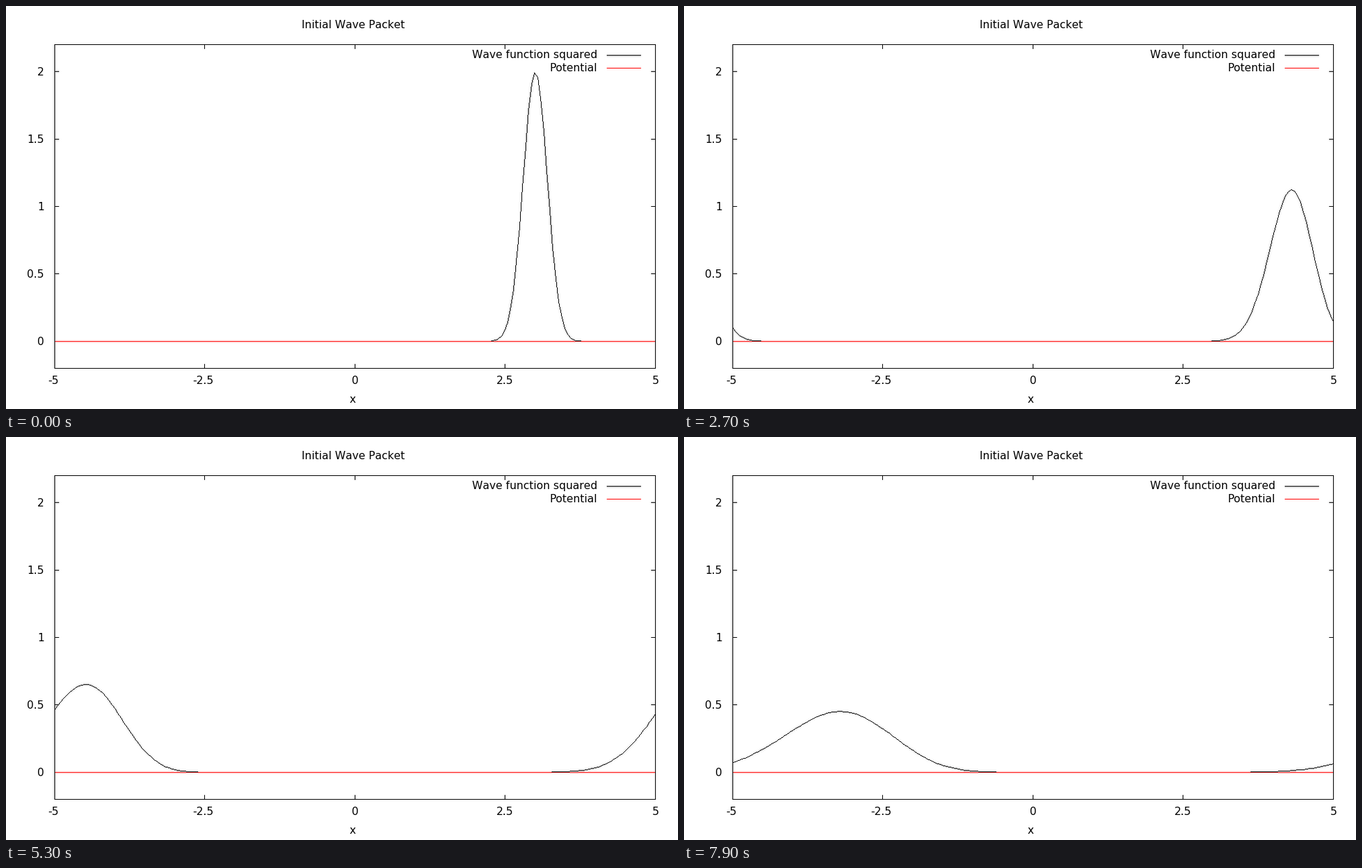
Animation, 966 px wide and 580 px high, one loop 8 s. Source, as a matplotlib script:

```python
import numpy as np
import matplotlib.pyplot as plt
from matplotlib.animation import FuncAnimation

# The chart is laid out on a 1000 x 600 canvas and shown slightly smaller.
CANVAS_W, CANVAS_H = 1000, 600
W, H, DPI = 966, 580, 100
LEFT, RIGHT, TOP, BOTTOM = 72, 966, 57, 539
X_MIN, X_MAX, Y_MIN, Y_MAX = -5, 5, -0.2, 2.2
TICK = 6
FONT_PX = 16 * W / CANVAS_W
FRAMES, INTERVAL = 80, 100
BLACK, RED = (0, 0, 0), (255, 0, 0)

# Gaussian packet on a periodic lattice
N, DT = 200, 0.005
X0, SIGMA, K0 = 3.0, 0.2, 10.0
x = np.linspace(X_MIN, X_MAX, N)
dx = x[1] - x[0]
psi0 = np.exp(-((x - X0) / (2 * SIGMA)) ** 2 + 1j * K0 * x)
psi0 /= np.sqrt(SIGMA * np.sqrt(2 * np.pi))
psi0_k = np.fft.fft(psi0)
# Energies of the three-point Laplacian
omega = (1 - np.cos(2 * np.pi * np.fft.fftfreq(N))) / dx**2


def density(t):
    return np.abs(np.fft.ifft(psi0_k * np.exp(-1j * omega * t))) ** 2


def nearest(v):
    """Nearest integer, halves going down."""
    return np.ceil(np.asarray(v) - 0.5 - 1e-6).astype(int)


def px(v):
    scale = (RIGHT - LEFT) / (X_MAX - X_MIN)
    return nearest(LEFT + (np.asarray(v) - X_MIN) * scale)


def py(v):
    scale = (BOTTOM - TOP) / (Y_MAX - Y_MIN)
    return BOTTOM - nearest((np.asarray(v) - Y_MIN) * scale)


def stroke(img, xs, ys, color):
    """One-pixel polyline without smoothing."""
    for x0, y0, x1, y1 in zip(xs[:-1], ys[:-1], xs[1:], ys[1:]):
        n = max(abs(x1 - x0), abs(y1 - y0)) + 1
        cols = np.floor(np.linspace(x0, x1, n) + 0.5).astype(int)
        rows = np.floor(np.linspace(y0, y1, n) + 0.5).astype(int)
        img[rows, cols] = color


def frame_box(img):
    stroke(img, [LEFT, RIGHT, RIGHT, LEFT, LEFT],
           [TOP, TOP, BOTTOM, BOTTOM, TOP], BLACK)


plt.rcParams["text.kerning_factor"] = 6
fig = plt.figure(figsize=(W / DPI, H / DPI), dpi=DPI, facecolor="white")
ax = fig.add_axes([0, 0, 1, 1])
ax.axis("off")


def label(cx, base, text, ha="center"):
    ax.text(cx, base, text, ha=ha, va="baseline", color="black",
            family="DejaVu Sans", size=FONT_PX * 72 / DPI)


base = np.full((CANVAS_H, CANVAS_W, 3), 255, np.uint8)
for v in (-5, -2.5, 0, 2.5, 5):
    c = int(px(v))
    stroke(base, [c, c], [TOP, TOP + TICK], BLACK)
    stroke(base, [c, c], [BOTTOM, BOTTOM - TICK], BLACK)
    label(c + 0.5 if v >= 0 else c - 1.5, 563, f"{v:g}")
for v in (0, 0.5, 1, 1.5, 2):
    r = int(py(v))
    stroke(base, [LEFT, LEFT + TICK], [r, r], BLACK)
    stroke(base, [RIGHT, RIGHT - TICK], [r, r], BLACK)
    label(57, r + 6, f"{v:g}", "right")

label(516.5, 33, "Initial Wave Packet")
label(516, 591, "x")
for text, row, color in (("Wave function squared", 73, BLACK),
                         ("Potential", 92, RED)):
    label(880, row + 5, text, "right")
    stroke(base, [894, 944], [row, row], color)

image = ax.imshow(base, extent=(0, CANVAS_W, CANVAS_H, 0),
                  interpolation="lanczos", aspect="auto")
ax.set_xlim(0, CANVAS_W)
ax.set_ylim(CANVAS_H, 0)
cols, zero = px(x), int(py(0))


def update(i):
    img = base.copy()
    stroke(img, cols, py(density(i * DT)), BLACK)
    stroke(img, [LEFT, RIGHT], [zero, zero], RED)
    frame_box(img)
    image.set_data(img)
    return (image,)


anim = FuncAnimation(fig, update, frames=FRAMES, interval=INTERVAL,
                     repeat=True, repeat_delay=0, blit=False)
plt.show()
```
